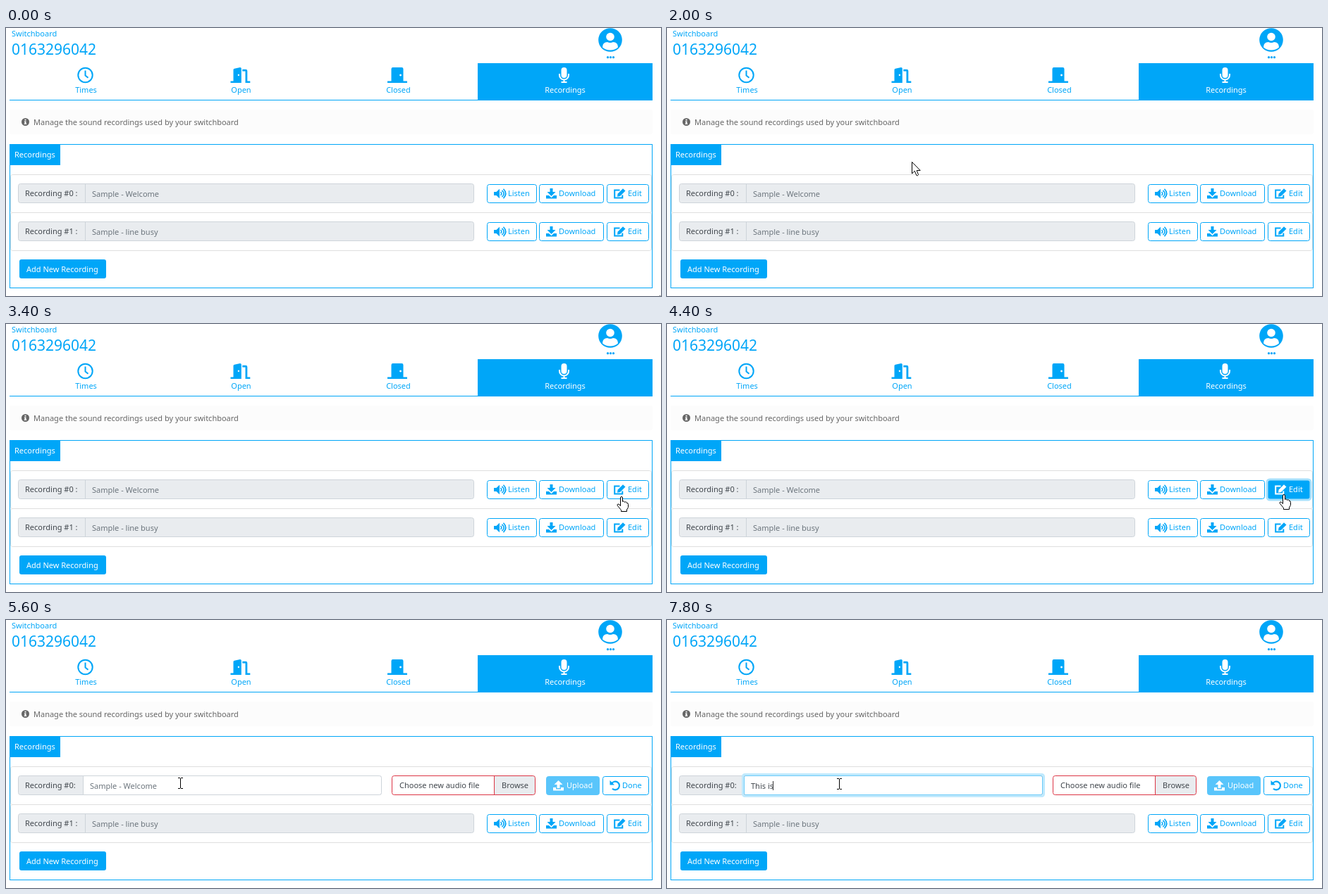
Animation, 929 px wide and 381 px high, one loop 8 s. Source, as an HTML page:

```html
<!DOCTYPE html>
<html lang="en">
<head>
<meta charset="utf-8">
<title>Switchboard recordings</title>
<style>
html, body { margin: 0; width: 100%; height: 100%; overflow: hidden; background: #fff; }
svg { display: block; width: 929px; height: 381px; --blue: #00a6f8; color: var(--blue); }
text { font: 11px "Noto Sans", sans-serif; fill: currentColor; }
.mid { text-anchor: middle; }
.phone { font-size: 21px; font-weight: 500; }
.label { fill: #41474d; }
.value { fill: #6c757d; }
.white { color: #fff; }
.solid { fill: currentColor; }
.line { fill: none; stroke: currentColor; stroke-width: 2; }
.blue { fill: var(--blue); }
.field { fill: #e9ecef; stroke: #ced4da; }
.list { fill: none; stroke: #dfdfdf; }
.face { fill: var(--face, #fff); stroke: var(--edge, var(--blue)); }
.hot { --face: var(--blue); color: #fff; }
.off { --face: #59c5fb; --edge: #59c5fb; color: #fff; }
.ring { fill: none; stroke: #a6e0fc; stroke-width: 3; }

/* one 8 s clock, hard steps */
.a { animation: 8s step-end infinite; }
.view { animation-name: view; }
.form { animation-name: form; }
.download-on { animation-name: download-on; }
.edit-on { animation-name: edit-on; }
.edit-focus { animation-name: edit-focus; }
.done-on { animation-name: done-on; }
.focus { animation-name: focus; }
.end-caret { animation-name: end-caret; }
.selected { animation-name: selected; }
.old { animation-name: old; }
.typed { animation-name: typed; }
.type { animation-name: type; }
.pointer { animation-name: move; }
.arrow { animation-name: arrow; }
.hand { animation-name: hand; }
.beam { animation-name: beam; }

@keyframes view { 0% { opacity: 1 } 57.5%, 100% { opacity: 0 } }
@keyframes form { 0% { opacity: 0 } 57.5%, 100% { opacity: 1 } }
@keyframes download-on { 0%, 42.5%, 100% { opacity: 0 } 32.5% { opacity: 1 } }
@keyframes edit-on { 0%, 57.5%, 100% { opacity: 0 } 50% { opacity: 1 } }
@keyframes edit-focus { 0%, 57.5%, 100% { opacity: 0 } 52.5% { opacity: 1 } }
@keyframes done-on { 0%, 60%, 100% { opacity: 0 } 57.5% { opacity: 1 } }
@keyframes focus { 0% { opacity: 0 } 72.5%, 100% { opacity: 1 } }
@keyframes end-caret { 0%, 77.5%, 100% { opacity: 0 } 72.5% { opacity: 1 } }
@keyframes selected { 0%, 85%, 100% { opacity: 0 } 77.5% { opacity: 1 } }
@keyframes old { 0% { opacity: 1 } 85%, 100% { opacity: 0 } }
@keyframes typed { 0% { opacity: 0 } 85%, 100% { opacity: 1 } }
@keyframes type {
  0%, 85% { transform: translateX(6px) }
  87.5% { transform: translateX(13px) }
  90% { transform: translateX(16px) }
  92.5% { transform: translateX(21px) }
  95% { transform: translateX(27px) }
  97.5%, 100% { transform: translateX(32px) }
}
@keyframes move {
  0% { transform: translate(927px, 380px) }
  7.5% { transform: translate(640px, 268px) }
  10% { transform: translate(345px, 190px) }
  25% { transform: translate(347px, 190px) }
  27.5% { transform: translate(470px, 202px) }
  30% { transform: translate(655px, 226px) }
  32.5% { transform: translate(814px, 238px) }
  42.5% { transform: translate(866px, 245px) }
  45% { transform: translate(872px, 249px) }
  50% { transform: translate(868px, 243px) }
  52.5% { transform: translate(868px, 242px) }
  60% { transform: translate(700px, 234px) }
  62.5% { transform: translate(430px, 230px) }
  65% { transform: translate(330px, 228px) }
  67.5% { transform: translate(268px, 226px) }
  70% { transform: translate(244px, 224px) }
  75%, 100% { transform: translate(241px, 225px) }
}
@keyframes arrow {
  0%, 45%, 60% { opacity: 1 }
  32.5%, 50%, 62.5%, 100% { opacity: 0 }
}
@keyframes hand {
  0%, 45%, 60%, 100% { opacity: 0 }
  32.5%, 50% { opacity: 1 }
}
@keyframes beam { 0% { opacity: 0 } 62.5%, 100% { opacity: 1 } }
</style>
</head>
<body>
<svg viewBox="0 0 929 381">
  <defs>
    <g id="listen">
      <rect class="face" x="682.5" y="222.5" width="70" height="26" rx="3"/>
      <path class="solid" d="M692 233h3.500l4.500-4.200v13.400l-4.500-4.200H692z"/>
      <path class="line" style="stroke-width:1.600" d="M701.500 233q2.500 2.500 0 5M703.500 230.800q5 4.700 0 9.400M705.500 228.800q6.500 6.700 0 13.400"/>
      <text x="712" y="239">Listen</text>
    </g>
    <g id="download">
      <rect class="face" x="756.500" y="222.500" width="91" height="26" rx="3"/>
      <path class="solid" d="M771.500 228h4v5h4l-6 6-6-6h4zM766 238h4l3.500 3.200 3.500-3.200h4v4.500h-15z"/>
      <text x="784" y="239">Download</text>
    </g>
    <g id="edit">
      <rect class="face" x="852.500" y="222.500" width="59" height="26" rx="3"/>
      <path class="line" d="M870.500 230.500H863.200V241.500H874.300V237.500"/>
      <path class="solid" d="M867.500 235.800l7.500-7.600 3.500 3.300-7.500 7.600-4 .7z"/>
      <text x="882" y="239">Edit</text>
    </g>
    <g id="upload">
      <rect class="face" x="766.500" y="222.500" width="75" height="26" rx="3"/>
      <path class="solid" d="M781.500 239h4v-5h4l-6-6-6 6h4zM776 238h4v2.500h7V238h4v4.500h-15z"/>
      <text x="795" y="239">Upload</text>
    </g>
    <g id="done">
      <rect class="face" x="846.500" y="222.500" width="65" height="26" rx="3"/>
      <path class="line" style="stroke-width:2.200" d="M859 232.500A5.900 5.900 0 1 1 860 239.800"/>
      <path class="solid" d="M856.500 228v6.500h6.500z"/>
      <text x="874" y="239">Done</text>
    </g>
    <g id="actions">
      <use href="#listen"/><use href="#download"/><use href="#edit"/>
    </g>
    <g id="locked">
      <rect class="field" x="17.500" y="221.500" width="646" height="27" rx="3"/>
      <path stroke="#ced4da" d="M112.500 222v26"/>
    </g>
  </defs>

  <!-- header -->
  <text x="8" y="12">Switchboard</text>
  <text class="phone" x="8" y="38">0163296042</text>
  <circle class="blue" cx="857" cy="17" r="16.800"/>
  <g fill="#fff">
    <circle cx="857" cy="12.500" r="5.800"/>
    <path d="M846 27.500q0-7.500 7-7.500q4 1.800 8 0q7 0 7 7.500q-4.500 4-11 4t-11-4z"/>
  </g>
  <g class="blue">
    <circle cx="853.500" cy="41.700" r="1.600"/><circle cx="857.500" cy="41.700" r="1.600"/><circle cx="861.500" cy="41.700" r="1.600"/>
  </g>

  <!-- tabs -->
  <path class="blue" d="M5 102h912v1H5zM669 50h248v53H669z"/>
  <circle class="line" cx="112.500" cy="67" r="10.200"/>
  <path class="line" d="M112.500 60.500V67.500l4 3.200"/>
  <text class="mid" x="113.500" y="92">Times</text>
  <path class="solid" fill-rule="evenodd" d="M318.500 75.500H322.500V59.500Q322.500 58 324 57.700L332 56q1.800 0 1.800 1.500V78H318.500zM329.800 65.500a1.100 1.400 0 1 0 .1 0zM335.300 58.700H340q2.300 0 2.300 2.300V75.500h4V78h-6.800V61.500h-4.200z"/>
  <text class="mid" x="333.500" y="92">Open</text>
  <path class="solid" fill-rule="evenodd" d="M541 75.500h5.500V58.200q0-2.200 2.200-2.200h12.600q2.200 0 2.200 2.200V75.500h5.500V78h-28zM559.500 65.600a1.400 1.400 0 1 0 .1 0z"/>
  <text class="mid" x="556.500" y="92">Closed</text>
  <g class="white">
    <rect class="solid" x="787.500" y="56" width="8" height="15" rx="4"/>
    <path class="line" d="M785 65v2a6.500 6.500 0 0 0 13 0v-2M791.500 73.500V77M787.500 77h8"/>
    <text class="mid" x="793" y="92">Recordings</text>
  </g>

  <!-- hint -->
  <rect x="5" y="116" width="912" height="35" rx="3" fill="#fcfcfc"/>
  <g color="#666">
    <circle class="solid" cx="27.500" cy="133.500" r="5.500"/>
    <path fill="#fff" d="M26.500 129.700h2v1.800h-2zM26 132.500h2.500v3.300h.7v1.200h-3.500v-1.200h.8v-2H26z"/>
    <text x="39" y="138">Manage the sound recordings used by your switchboard</text>
  </g>

  <!-- panel -->
  <rect x="5.500" y="165.500" width="911" height="204" fill="none" stroke="#00a6f8"/>
  <rect class="blue" x="5" y="165" width="72" height="30"/>
  <text class="white" x="12" y="184">Recordings</text>
  <rect class="list" x="6.500" y="208.500" width="909" height="54" rx="3"/>
  <rect class="list" x="6.500" y="262.500" width="909" height="54" rx="3"/>
  <rect class="blue" x="19" y="329" width="123" height="27" rx="3"/>
  <text class="white" x="29" y="347">Add New Recording</text>

  <use href="#locked" y="54"/>
  <text class="label" x="27" y="293">Recording #1 :</text>
  <text class="value" x="122" y="294">Sample - line busy</text>
  <use href="#actions" y="54"/>

  <!-- first row, locked -->
  <g class="a view">
    <use href="#locked"/>
    <text class="label" x="27" y="239">Recording #0 :</text>
    <text class="value" x="122" y="240">Sample - Welcome</text>
    <use href="#actions"/>
    <g class="a download-on hot"><use href="#download"/></g>
    <g class="a edit-on hot"><use href="#edit"/></g>
    <rect class="a edit-focus ring" x="851" y="221" width="62" height="29" rx="4"/>
  </g>

  <!-- first row, editing -->
  <g class="a form">
    <rect class="field" x="17.500" y="221.500" width="515" height="27" rx="3"/>
    <path fill="#fff" stroke="#ced4da" d="M109.500 221.500H529.500q3 0 3 3v21q0 3-3 3H109.500z"/>
    <text class="label" x="27" y="239">Recording #0:</text>
    <g class="a focus">
      <rect class="ring" style="stroke:#bfe9fd" x="107.500" y="219.500" width="427" height="31" rx="3"/>
      <rect fill="none" stroke="#6ccbf9" x="109.500" y="221.500" width="423" height="27" rx="2"/>
    </g>
    <text class="a old value" x="119" y="240">Sample - Welcome</text>
    <path class="a end-caret" stroke="#333" d="M214.500 229v13"/>
    <g class="a selected white">
      <rect x="119" y="229" width="94" height="13" fill="#0078d7"/>
      <text x="119" y="240">Sample - Welcome</text>
    </g>
    <g class="a typed">
      <text class="label" x="119" y="240">This is</text>
      <g class="a type">
        <rect x="118" y="228" width="40" height="16" fill="#fff"/>
        <path stroke="#333" d="M118.500 229v13"/>
      </g>
    </g>

    <rect x="547.500" y="221.500" width="203" height="27" rx="3" fill="#fff"/>
    <path fill="#e9ecef" d="M692 222h58v26h-58z"/>
    <rect x="547.500" y="221.500" width="203" height="27" rx="3" fill="none" stroke="#dc3545"/>
    <path stroke="#dc3545" d="M692.500 222v26"/>
    <text class="label" x="558" y="239">Choose new audio file</text>
    <text class="label" x="703" y="239">Browse</text>
    <g class="off"><use href="#upload"/></g>
    <use href="#done"/>
    <g class="a done-on hot"><use href="#done"/></g>
  </g>

  <!-- pointer -->
  <g class="a pointer" fill="#fff" stroke="#000">
    <path class="a arrow" d="M.5.5V17l3.800-3.700L7 19.700q1.200.9 2.600-1L7.200 12.500h5z"/>
    <path class="a hand" d="M5.500 13.500V2Q5.500.5 7 .5T8.500 2V7.500Q9 6.500 10.200 7T11.500 8.500Q12.500 7.300 13.800 8.200T14.500 9.500Q16.500 9.200 16.500 11.500V15.500L14.500 19V21.500H6.500V19.500L1.500 13.500Q.3 11.500 1.800 11T4 12z"/>
    <path class="a beam" fill="none" d="M0 .5H3M4 .5H7M3.500 1V15M0 15.500H3M4 15.500H7"/>
  </g>
</svg>
</body>
</html>
```
